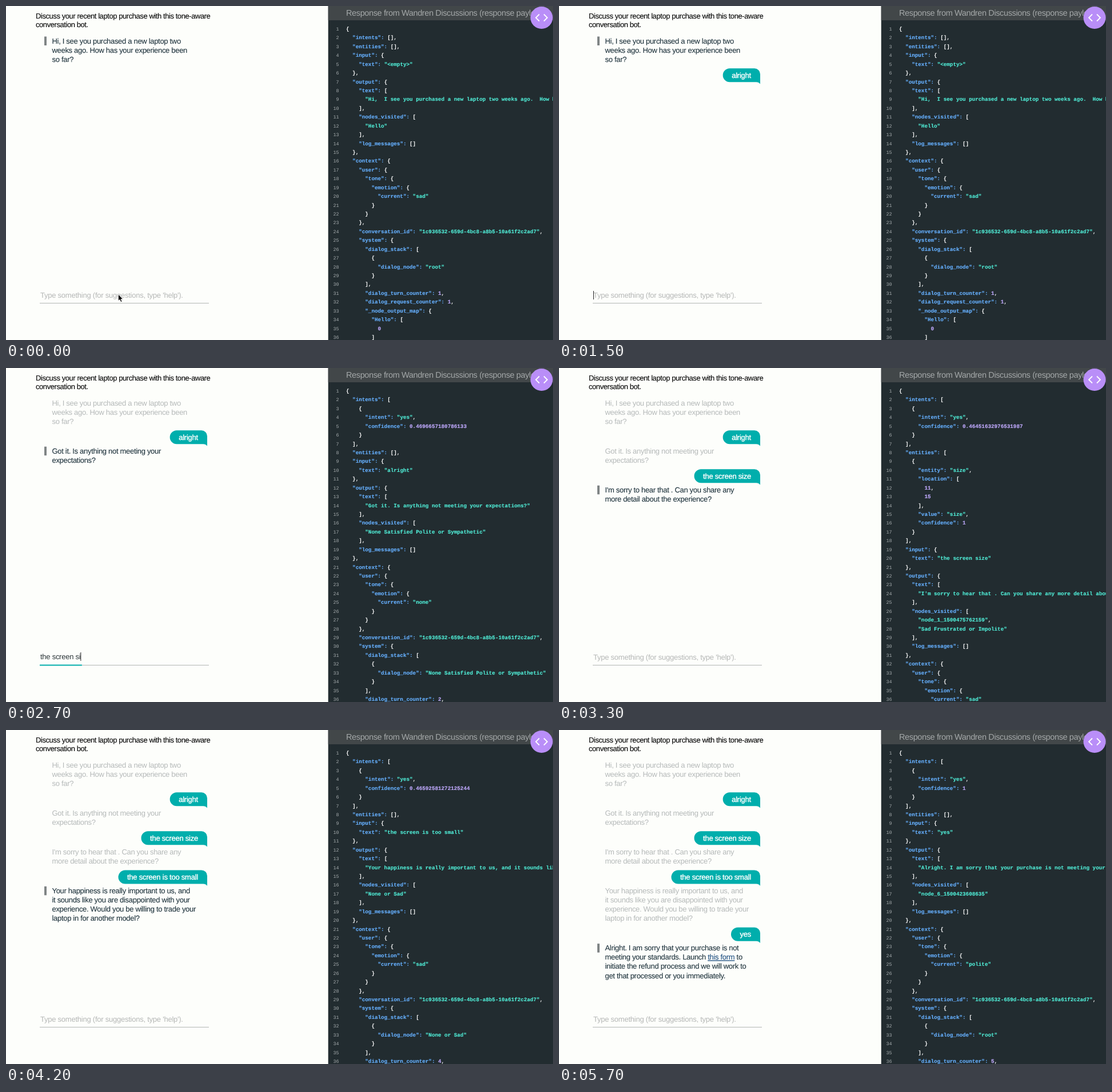
Animation, 957 px wide and 585 px high, one loop 6 s. Source, as an HTML page:

```html
<!DOCTYPE html>
<html lang="en">
<head>
<meta charset="utf-8">
<title>Tone-aware chat</title>
<style>
html, body { margin: 0; width: 100%; height: 100%; overflow: hidden; background: #fdfefb; }
svg { display: block; width: 957px; height: 585px; }
text { font: 13px "Liberation Sans", Arial, sans-serif; letter-spacing: -.31px; white-space: pre; text-rendering: geometricPrecision; }
.intro { fill: #111; letter-spacing: -.43px; stroke: #111; stroke-width: .15px; }
.bot { fill: #b5b9b9; }
.bot.latest { fill: #20343e; stroke: #20343e; stroke-width: .1px; }
.link { fill: #1f5590; text-decoration: underline; }
.user { fill: #fff; stroke: #fff; stroke-width: .4px; text-anchor: end; letter-spacing: -.23px; }
.hint { fill: #b5b7b6; letter-spacing: -.24px; }
.typed { fill: #2c3639; letter-spacing: -.26px; }
.heading { font-size: 14.5px; letter-spacing: -.38px; fill: #a4a8a9; }
.code { font: bold 9.25px "Liberation Mono", "Courier New", monospace; letter-spacing: 0; fill: #fff; }
.num { font-size: 8.4px; font-weight: normal; fill: #a5abad; text-anchor: end; }
.key { fill: #66b0ff; stroke: #66b0ff; stroke-width: .15px; }
.str { fill: #50ecd6; stroke: #50ecd6; stroke-width: .15px; }
.val { fill: #c0aaff; stroke: #c0aaff; stroke-width: .15px; }
</style>
</head>
<body>
<svg viewBox="0 0 957 585">
  <rect width="957" height="585" fill="#fdfefb"/>
  <text class="intro" x="52" y="21.8">Discuss your recent laptop purchase with this tone-aware</text>
  <text class="intro" x="52" y="37.3">conversation bot.</text>
  <g id="chat"></g>
  <path d="M59 520.5H355" stroke="#b3b6b5"/>
  <g id="entry"></g>
  <rect x="563.7" width="394" height="585" fill="#222c30"/>
  <rect x="563.7" width="394" height="25" fill="#424749"/>
  <text class="heading" x="595" y="17">Response from Wandren Discussions (response payload)</text>
  <g id="code"></g>
  <circle cx="937" cy="20.5" r="19.5" fill="#b98ef8"/>
  <path d="M933 14.5L927 20.5L933 26.5M941 14.5L947 20.5L941 26.5" fill="none" stroke="#fff" stroke-width="1.8"/>
  <g id="pointer"></g>
</svg>
<script>
const LOOP = 6000;
const LINE = 16.1;
const ROW = 15.43;

// Bot messages are arrays of lines, user messages are strings.
const messages = [
  ["Hi, I see you purchased a new laptop two", "weeks ago. How has your experience been", "so far?"],
  "alright",
  ["Got it. Is anything not meeting your", "expectations?"],
  "the screen size",
  ["I'm sorry to hear that . Can you share any", "more detail about the experience?"],
  "the screen is too small",
  ["Your happiness is really important to us, and", "it sounds like you are disappointed with your",
   "experience. Would you be willing to trade your", "laptop in for another model?"],
  "yes",
  ["Alright. I am sorry that your purchase is not",
   'meeting your standards. Launch <tspan class="link">this form</tspan> to',
   "initiate the refund process and we will work to", "get that processed or you immediately."]
];

const payload = ({ confidence, entities = [], input, reply, nodes, tone, stack = "root", turn, map }) => ({
  intents: confidence ? [{ intent: "yes", confidence }] : [],
  entities,
  input: { text: input },
  output: { text: [reply], nodes_visited: nodes, log_messages: [] },
  context: {
    user: { tone: { emotion: { current: tone } } },
    conversation_id: "1c936532-659d-4bc8-a8b5-10a61f2c2ad7",
    system: {
      dialog_stack: [{ dialog_node: stack }],
      dialog_turn_counter: turn,
      dialog_request_counter: turn,
      _node_output_map: map
    }
  }
});

const polite = "None Satisfied Polite or Sympathetic";
const payloads = [
  { input: "<empty>", reply: "Hi,  I see you purchased a new laptop two weeks ago.  How has your experience been so far?",
    nodes: ["Hello"], tone: "sad", turn: 1, map: { Hello: [0] } },
  { confidence: 0.4696657180786133, input: "alright", reply: "Got it. Is anything not meeting your expectations?",
    nodes: [polite], tone: "none", stack: polite, turn: 2 },
  { confidence: 0.46451632976531987,
    entities: [{ entity: "size", location: [11, 15], value: "size", confidence: 1 }],
    input: "the screen size", reply: "I'm sorry to hear that . Can you share any more detail about the experience?",
    nodes: ["node_1_1500475762159", "Sad Frustrated or Impolite"], tone: "sad", turn: 3 },
  { confidence: 0.46592581272125244, input: "the screen is too small",
    reply: "Your happiness is really important to us, and it sounds like you are disappointed",
    nodes: ["None or Sad"], tone: "sad", stack: "None or Sad", turn: 4 },
  { confidence: 1, input: "yes", reply: "Alright. I am sorry that your purchase is not meeting your standards.",
    nodes: ["node_6_1500423608635"], tone: "polite", turn: 5 }
].map(payload);

// start time, messages shown, typed text, caret visible, pointer
const steps = [
  [0, 1, "", false, "arrow"],
  [600, 1, "", true, "beam"],
  [1200, 1, "alrig", true],
  [1500, 2, "", true],
  [1800, 3, "", false],
  [2100, 3, "t", true],
  [2400, 3, "the sc", true],
  [2700, 3, "the screen si", true],
  [3000, 4, "", true],
  [3300, 5, "", false],
  [3900, 5, "the screen is too s", true],
  [4200, 7, "", false],
  [4500, 7, "", true],
  [4800, 7, "yes", true],
  [5100, 8, "", true],
  [5400, 9, "", false]
];

const pointers = {
  arrow: '<path d="M196.5 505V516.5L199 514.2L201 518.5L203 517.6L201.1 513.4H204.6Z" fill="#000" stroke="#fff" stroke-width=".8"/>',
  beam: '<path d="M171.5 501.5Q174 501.5 174 503.5Q174 501.5 176.5 501.5M174 503V512M171.5 513.5Q174 513.5 174 511.5Q174 513.5 176.5 513.5M172.5 508H175.5" fill="none" stroke="#111" stroke-width="1.2"/>'
};

const layer = id => document.getElementById(id);
const label = (cls, x, y, content) => `<text class="${cls}" x="${x}" y="${y}">${content}</text>`;
const escapeText = s => s.replace(/&/g, "&amp;").replace(/</g, "&lt;");

function bubble(text, y) {
  const probe = layer("chat");
  probe.innerHTML = label("user", 336, 0, text);
  const left = 336 - probe.firstChild.getComputedTextLength() - 15.5;
  return `<path d="M${left + 12} ${y - 12}H342a10 10 0 0 1 10 10V${y + 15.5}Q350 ${y + 12} 345 ${y + 12}H${left + 12}a12 12 0 0 1 0-24Z" fill="#00aeac"/>`
    + label("user", 336, y + 4.5, text);
}

function drawChat(shown) {
  const latest = shown - (shown % 2 ? 1 : 2);
  let y = 61, html = "";
  messages.slice(0, shown).forEach((message, i) => {
    if (typeof message === "string") {
      html += bubble(message, y);
      y += 24;
      return;
    }
    if (i === latest) html += `<rect x="67" y="${y - 7.5}" width="4" height="15.5" fill="#7f8485"/>`;
    message.forEach((line, n) => {
      html += label(i === latest ? "bot latest" : "bot", 80.5, y + n * LINE + 4.5, line);
    });
    y += (message.length - 1) * LINE + 28;
  });
  layer("chat").innerHTML = html;
}

function drawEntry(typed, caret) {
  const entry = layer("entry");
  entry.innerHTML = typed
    ? label("typed", 60, 510, typed)
    : label("hint", 60, 511, "Type something (for suggestions, type 'help').");
  const end = 60.5 + (typed ? entry.firstChild.getComputedTextLength() : 0);
  let html = "";
  if (caret) html += `<path d="M${end} ${typed ? 498 : 499}v15" stroke="#222"/>`;
  if (typed) html += `<path d="M59 520.5H${end + 2}" stroke="#00aeac" stroke-width="2"/>`;
  entry.insertAdjacentHTML("beforeend", html);
}

const paint = line => line.replace(/("[^"]*":)|("[^"]*")|(-?\d[\d.]*)/g, (token, key, str) =>
  `<tspan class="${key ? "key" : str ? "str" : "val"}">${token}</tspan>`);

function drawCode(index) {
  const lines = JSON.stringify(payloads[index], null, 2).split("\n").slice(0, 36);
  layer("code").innerHTML = lines.map((line, i) => {
    const y = 43 + i * ROW;
    return label("code num", 582.5, y, i + 1) + label("code", 595, y, paint(escapeText(line)));
  }).join("");
}

let current = null;

function draw(time) {
  const step = steps.filter(s => s[0] <= time % LOOP).pop();
  if (step !== current) {
    current = step;
    const [, shown, typed, caret, pointer] = step;
    drawChat(shown);
    drawEntry(typed, caret);
    drawCode(Math.floor((shown - 1) / 2));
    layer("pointer").innerHTML = pointers[pointer] || "";
  }
}

const start = performance.now();
function tick() {
  draw(performance.now() - start);
  requestAnimationFrame(tick);
}
tick();
</script>
</body>
</html>
```
